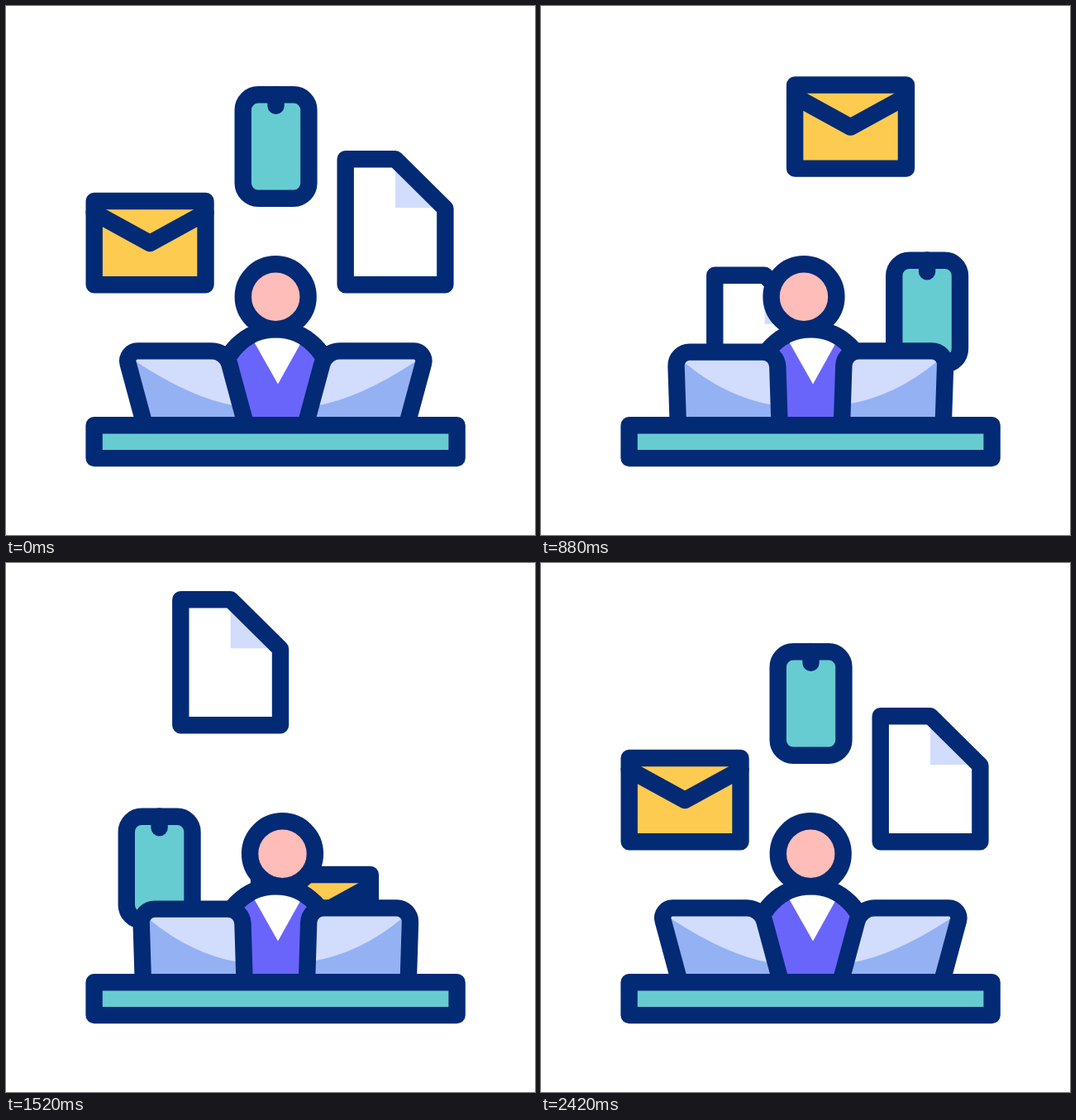
Write an HTML page with a canvas that moves like this. It is 640 by 640 pixels and loops after 2620 ms.

```html
<!DOCTYPE html>
<html lang="en">
<head>
<meta charset="utf-8">
<title>Office work</title>
<style>
html, body { margin: 0; height: 100%; overflow: hidden; background: #fff; }
canvas { display: block; }
</style>
</head>
<body>
<canvas id="stage" width="640" height="640"></canvas>
<script>
const ctx = document.getElementById('stage').getContext('2d');
const LOOP = 2620, MOVE = 2400, ORBIT = 149.5;
const NAVY = '#032a75', TEAL = '#66ccd1', YELLOW = '#fdcb50', PINK = '#febdb8',
      VIOLET = '#6a65fa', BLUE = '#93b1f3', PALE = '#d2dcfd', WHITE = '#fff';

const smooth = p => p * p * (3 - 2 * p);
const mix = (a, b, p) => a + (b - a) * p;

function fill(path, color) {
  ctx.fillStyle = color;
  ctx.fill(new Path2D(path));
}

function shape(path, color) {
  const p = new Path2D(path);
  if (color) {
    ctx.fillStyle = color;
    ctx.fill(p);
  }
  ctx.stroke(p);
}

function at(x, y, draw) {
  ctx.save();
  ctx.translate(x, y);
  draw();
  ctx.restore();
}

function circle(x, y, r, color) {
  const p = new Path2D();
  p.arc(x, y, r, 0, 2 * Math.PI);
  shape(p, color);
}

function phone() {
  const p = new Path2D();
  p.roundRect(286.7, 107.3, 79.7, 125.5, 18.5);
  shape(p, TEAL);
  shape('M326.5 107V120.8');
}

function sheet() {
  const outline = 'M410.7 185.2H471L531.4 245V337.2H410.7Z';
  fill(outline, WHITE);
  fill('M471 185.2V244.3H531Z', PALE);
  shape(outline);
}

function envelope() {
  shape('M106.7 236H241.5V337.2H106.7Z', YELLOW);
  shape('M106.7 250L174.1 287L241.5 250');
}

// Left-hand laptop; lean goes from 0 (outward) to 1 (inward).
function laptop(lean, drop) {
  const m = (a, b) => mix(a, b, lean);
  const dy = drop * lean, top = 417.4 + dy;
  const shift = m(-0.27, 0.163) * (497 - top);
  const left = m(165, 166), right = m(287.5, 289);
  const foot = -shift * 10 / (497 - top);

  const body = new Path2D();
  body.moveTo(left + foot, 507);
  body.arcTo(left + shift, top, right + shift, top, m(12, 20));
  body.arcTo(right + shift, top, right + foot, 507, m(22, 15));
  body.lineTo(right + foot, 507);

  ctx.save();
  ctx.clip(body);
  ctx.fillStyle = BLUE;
  ctx.fillRect(100, 400, 250, 110);
  ctx.fillStyle = PALE;
  ctx.beginPath();
  ctx.moveTo(left + shift, top);
  ctx.lineTo(m(157, 188), m(430, 431) + dy);
  ctx.quadraticCurveTo(m(225, 224), m(475, 470) + dy, m(279, 284), m(484, 480) + dy);
  ctx.lineTo(right + 10, 484);
  ctx.lineTo(right + shift, top);
  ctx.fill();
  ctx.restore();
  ctx.stroke(body);
}

function person(headX) {
  circle(326.5, 457.6, 66.2, VIOLET);
  fill('M296.5 400L329 457.5L361 400Z', WHITE);
  ctx.beginPath();
  ctx.arc(326.5, 457.6, 66.2, 0, 2 * Math.PI);
  ctx.stroke();
  circle(headX, 351.7, 39.4, PINK);
}

function draw(time) {
  const t = Math.min(time, MOVE);
  const angle = 2 * Math.PI * smooth(t / MOVE);
  const sin = ORBIT * Math.sin(angle), gap = ORBIT * (1 - Math.cos(angle));

  // Quarter-loop poses, eased from one to the next.
  const quarter = Math.min(3, Math.floor(t / 600));
  const part = smooth(t / 600 - quarter);
  const sway = [0, -15, 0, 15, 0];
  const headX = 326.2 + mix(sway[quarter], sway[quarter + 1], part);
  const lean = quarter % 2 ? 1 - part : part;

  ctx.fillStyle = WHITE;
  ctx.fillRect(0, 0, 640, 640);
  ctx.strokeStyle = NAVY;
  ctx.lineWidth = 20.4;
  ctx.lineCap = ctx.lineJoin = 'round';

  at(-gap, sin, sheet);
  at(gap, -sin, envelope);
  at(sin, gap, phone);
  person(headX);
  laptop(lean, 2.2);
  ctx.save();
  ctx.translate(652.6, 0);
  ctx.scale(-1, 1);
  laptop(lean, 0);
  ctx.restore();
  shape('M106.6 507.2H545.6V547.1H106.6Z', TEAL);
}

function tick() {
  draw(performance.now() % LOOP);
  requestAnimationFrame(tick);
}
tick();
</script>
</body>
</html>
```
